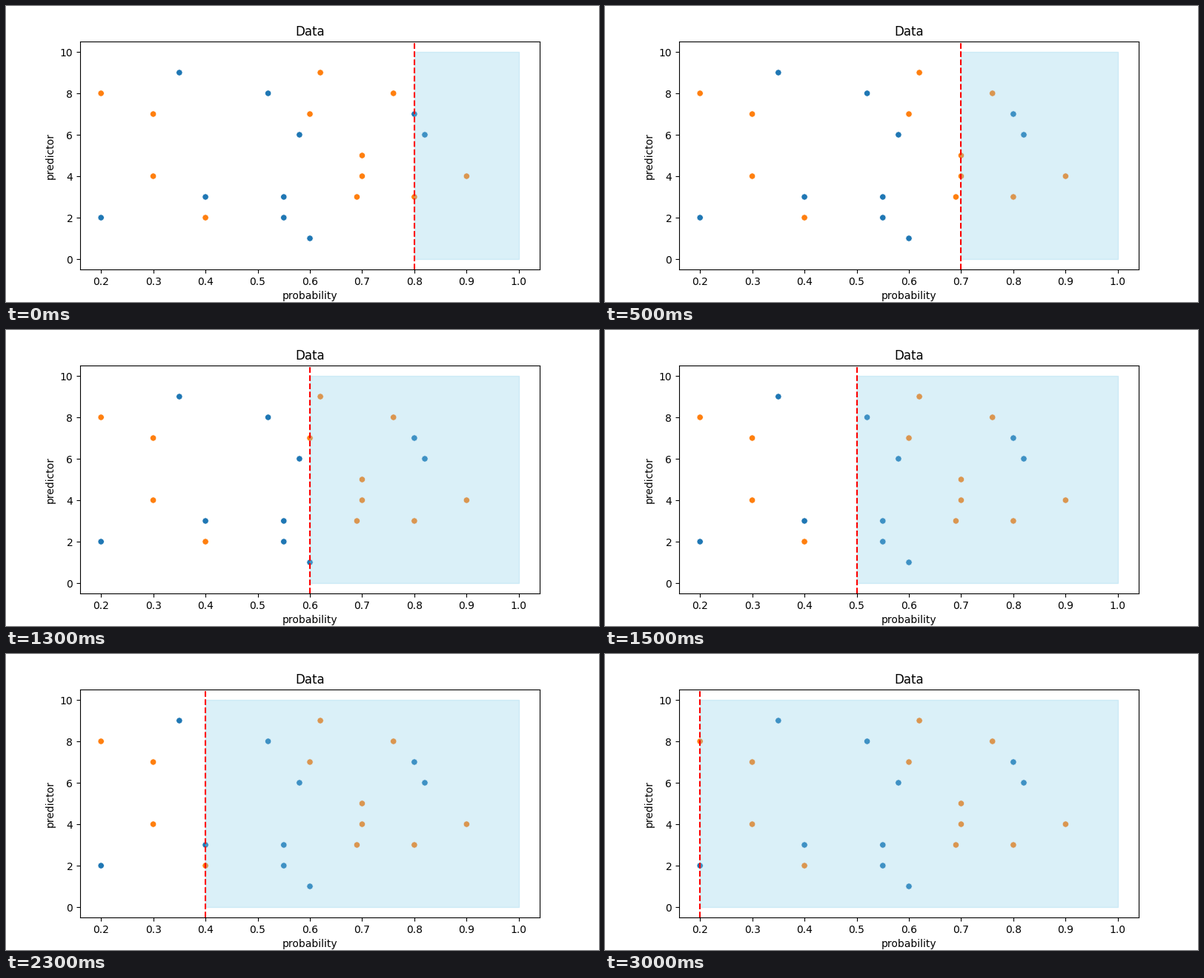
These frames come from a looping animation (800 px wide and 400 px high, 3500 ms). A matplotlib script:

```python
import matplotlib.pyplot as plt
from matplotlib.animation import FuncAnimation

STEPS = 7
STEP_MS = 500
START = 0.8


def series(x, dx, *ys):
    """Points spaced evenly in x."""
    return [(x + i * dx, y) for i, y in enumerate(ys)]


blue = (series(0.2, 0.2, 2, 3, 1, 7) + series(0.35, 0.2, 9, 3)
        + series(0.52, 0.03, 8, 2, 6) + [(0.82, 6)])
orange = (series(0.2, 0.1, 8, 7, 2) + series(0.6, 0.1, 7, 5, 3, 4)
          + series(0.62, 0.07, 9, 3, 8) + series(0.3, 0.4, 4, 4))

fig, ax = plt.subplots(figsize=(8, 4), dpi=100)
ax.set(title="Data", xlabel="probability", ylabel="predictor",
       xlim=(0.16, 1.04), ylim=(-0.5, 10.5))

# One collection with mixed colours keeps the dots at subpixel positions.
colors = ["tab:blue"] * len(blue) + ["tab:orange"] * len(orange)
ax.scatter(*zip(*blue, *orange), s=36, c=colors, edgecolor="white", linewidth=0.48)

region = ax.fill_between([START, 1], 0, 10, color="skyblue", alpha=0.3)
cutoff = ax.axvline(START, color="red", linestyle="--")


def update(step):
    """Lower the cutoff by 0.1 per step and shade everything above it."""
    x = START - step / 10
    cutoff.set_xdata([x, x])
    region.set_verts([[(x, 0), (1, 0), (1, 10), (x, 10)]])
    return region, cutoff


anim = FuncAnimation(fig, update, frames=STEPS, interval=STEP_MS,
                     repeat=True, repeat_delay=0)
plt.show()
```
